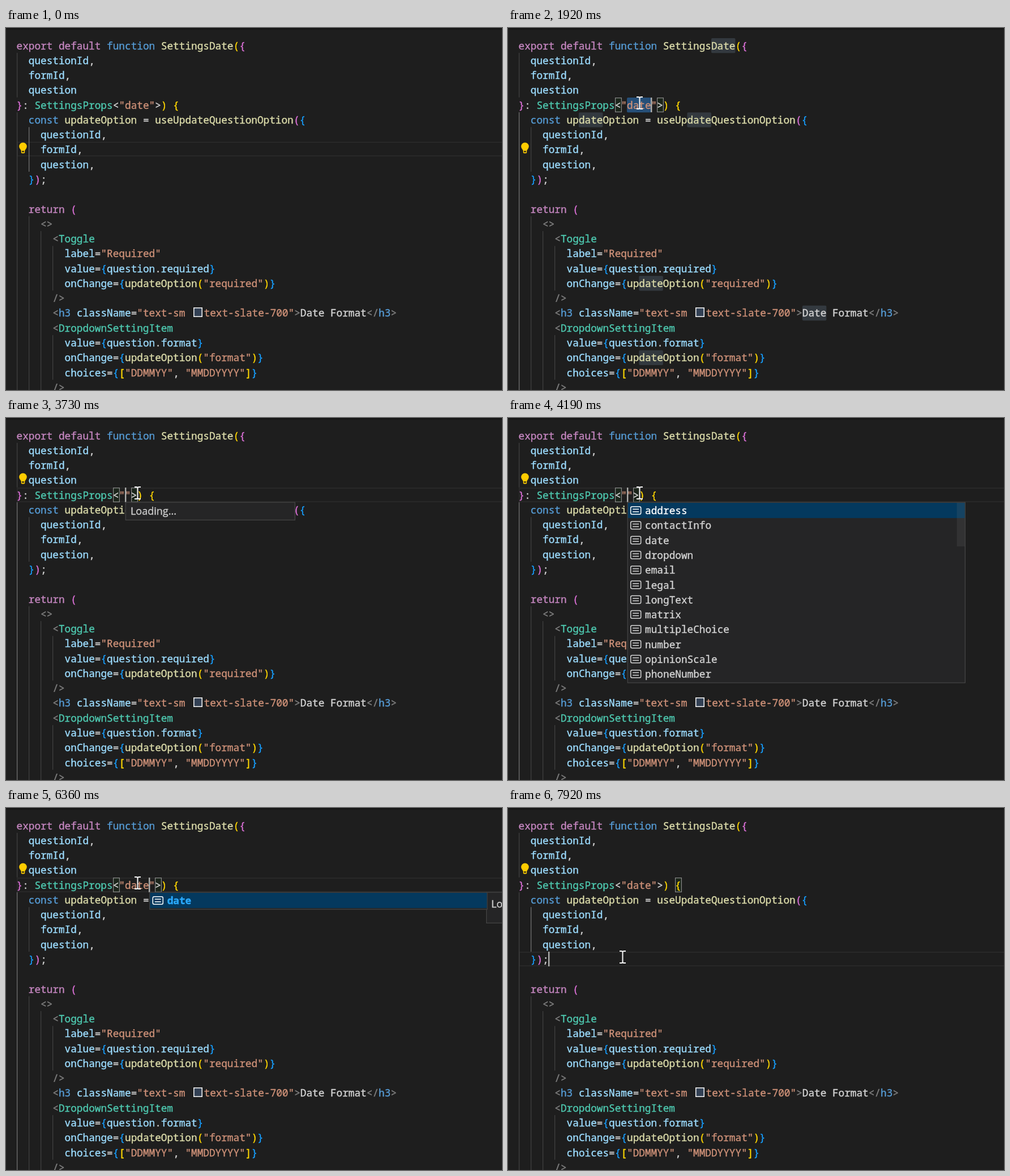
Recreate the animation shown at these times as an HTML page with a canvas. Size 876x640 px, loop 7.99 s.

```html
<!DOCTYPE html>
<html lang="en">
<head>
<meta charset="utf-8">
<title>Code editor autocomplete</title>
<style>
  html, body { margin: 0; width: 100%; height: 100%; overflow: hidden; background: #1e1e1e; }
  canvas { display: block; }
</style>
</head>
<body>
<canvas id="stage" width="876" height="640"></canvas>
<script>
const ctx = document.getElementById('stage').getContext('2d');
const LOOP = 7990, W = 876, H = 640;
const X0 = 18.5, ADV = 10.64, TOP = 17.6, ROW = 26.27, BASE = 20;
const SIZE = ADV / 0.6;
const MONO = '"Noto Sans Mono", "DejaVu Sans Mono", monospace';
const SANS = '18px "Open Sans", "Noto Sans", sans-serif';

const COLORS = {
  p: '#c586c0', b: '#569cd6', y: '#dcdcaa', v: '#9cdcfe', t: '#4ec9b0', s: '#ce9178',
  w: '#d4d4d4', x: '#808080', g: '#ffd700', o: '#da70d6', u: '#179fff'
};

// Each "~" starts a run; the next letter is its colour, "#" is the colour swatch.
const propsLine = value => `~o}~w: ~tSettingsProps~w<~s"${value}"~w>~g) {`;
const LINES = [
  '~pexport default ~bfunction ~ySettingsDate~g(~o{',
  '~w  ~vquestionId~w,',
  '~w  ~vformId~w,',
  '~w  ~vquestion',
  '',
  '~w  ~bconst ~yupdateOption ~w= ~yuseUpdateQuestionOption~o(~u{',
  '~w    ~vquestionId~w,',
  '~w    ~vformId~w,',
  '~w    ~vquestion~w,',
  '~w  ~u}~o)~w;',
  '',
  '~w  ~preturn ~o(',
  '~w    ~x<>',
  '~w      ~x<~tToggle',
  '~w        ~vlabel~w=~s"Required"',
  '~w        ~vvalue~w=~u{~vquestion~w.~vrequired~u}',
  '~w        ~vonChange~w=~u{~yupdateOption~g(~s"required"~g)~u}',
  '~w      ~x/>',
  '~w      ~x<~bh3 ~vclassName~w=~s"text-sm ~#~stext-slate-700"~x>~wDate Format~x</~bh3~x>',
  '~w      ~x<~tDropdownSettingItem',
  '~w        ~vvalue~w=~u{~vquestion~w.~vformat~u}',
  '~w        ~vonChange~w=~u{~yupdateOption~g(~s"format"~g)~u}',
  '~w        ~vchoices~w=~u{~g[~s"DDMMYY"~w, ~s"MMDDYYYY"~g]~u}',
  '~w      ~x/>'
];
const OPTIONS = ['address', 'contactInfo', 'date', 'dropdown', 'email', 'legal', 'longText',
  'matrix', 'multipleChoice', 'number', 'opinionScale', 'phoneNumber'];

// column, first line, last line
const GUIDES = [[0, 1, 3], [0, 5, 24], [2, 6, 8], [2, 12, 24], [4, 13, 24], [6, 14, 16], [6, 20, 22]];

// line, column, extra offset of every other "date"
const MATCHES = [[0, 32, 0], [5, 10, 0], [5, 28, 0], [16, 20, 0], [18, 45, 22.5], [21, 20, 0]];

const colX = col => X0 + col * ADV;
const rowY = line => TOP + line * ROW;
const within = (t, from, to) => t >= from && t < to;

function rect(x, y, w, h, color) {
  ctx.fillStyle = color;
  ctx.fillRect(x, y, w, h);
}

function frame(x, y, w, h, fill, stroke, line = 1.2) {
  rect(x, y, w, h, fill);
  ctx.strokeStyle = stroke;
  ctx.lineWidth = line;
  ctx.strokeRect(x + line / 2, y + line / 2, w - line, h - line);
}

// The thin outline gives the glyphs a slightly heavier stem.
function text(str, x, y, color, font) {
  ctx.font = font || `${SIZE}px ${MONO}`;
  ctx.fillStyle = ctx.strokeStyle = color;
  ctx.lineWidth = 0.4;
  ctx.fillText(str, x, y);
  ctx.strokeText(str, x, y);
}

function mark(line, col, len, color, dx = 0) {
  ctx.fillStyle = color;
  ctx.beginPath();
  ctx.roundRect(colX(col) + dx, rowY(line) + 0.4, len * ADV, ROW, 2);
  ctx.fill();
}

function bracketBox(line, col) {
  frame(Math.round(colX(col)), Math.round(rowY(line)), 12, 26, 'rgba(0,100,0,.1)', '#888');
}

function codeLine(src, line) {
  let x = X0;
  for (const run of src.split('~').slice(1)) {
    if (run[0] === '#') {
      frame(331, Math.floor(rowY(line) + 4), 16, 17, '#334155', '#eeeeee', 1.6);
      x += 22.5;
    } else {
      const str = run.slice(1);
      text(str, x, rowY(line) + BASE, COLORS[run[0]]);
      x += str.length * ADV;
    }
  }
}

function bulb(line) {
  const y = rowY(line) + 0.5;
  ctx.fillStyle = '#ffcc00';
  ctx.beginPath();
  ctx.arc(30, y + 7.3, 6.8, 0, 7);
  ctx.fill();
  ctx.beginPath();
  ctx.moveTo(24.6, y + 11);
  ctx.lineTo(35.4, y + 11);
  ctx.lineTo(33.2, y + 15);
  ctx.lineTo(33.2, y + 18.5);
  ctx.lineTo(32, y + 19.6);
  ctx.lineTo(28, y + 19.6);
  ctx.lineTo(26.8, y + 18.5);
  ctx.lineTo(26.8, y + 15);
  ctx.fill();
  rect(28.2, y + 15.2, 3.6, 2.4, '#1e1e1e');
}

function beam(x, y) {
  const path = new Path2D();
  for (const s of [-1, 1]) {
    path.moveTo(x - 5.5, y + s * 10.6);
    path.lineTo(x - 2.5, y + s * 10.6);
    path.quadraticCurveTo(x, y + s * 10.6, x, y + s * 8.5);
    path.quadraticCurveTo(x, y + s * 10.6, x + 2.5, y + s * 10.6);
    path.lineTo(x + 5.5, y + s * 10.6);
  }
  path.moveTo(x, y - 9);
  path.lineTo(x, y + 9);
  ctx.strokeStyle = '#f4f4f4';
  ctx.lineWidth = 2;
  ctx.stroke(path);
}

function optionIcon(x, y, color) {
  ctx.strokeStyle = color;
  ctx.lineWidth = 1.5;
  ctx.beginPath();
  ctx.roundRect(x, y - 6.8, 18, 13.6, 2.5);
  for (const dy of [-2.2, 2.2]) {
    ctx.moveTo(x + 3.5, y + dy);
    ctx.lineTo(x + 14.5, y + dy);
  }
  ctx.stroke();
}

function suggestions(x, items, typed, slider) {
  const y = 148.5;
  frame(x, y, 597.3, items.length * ROW + 5, '#252526', '#454545');
  rect(x + 1.2, y + 1.5, 594.8, ROW + 0.6, '#04395e');
  items.forEach((item, i) => {
    const mid = y + 15 + i * ROW, color = i ? '#d4d4d4' : '#ffffff';
    optionIcon(x + 6, mid, color);
    const hit = item.slice(0, typed);
    if (hit) text(hit, x + 31.4, mid + 6.7, i ? '#18a3ff' : '#2aaaff', `bold ${SIZE}px ${MONO}`);
    text(item.slice(typed), x + 31.4 + typed * ADV, mid + 6.7, color);
  });
  if (slider) rect(x + 582, y + 1.5, 14, 77, `rgba(121,121,121,${slider})`);
}

function details(x) {
  frame(x, 148.5, 300, 55.5, '#252526', '#454545');
  text('Loading...', x + 9, 176, '#cccccc', SANS);
}

function hop(t, start, gap, n) {
  return Math.max(0, Math.min(n, Math.floor((t - start) / gap) + 1)) / n;
}

function pointer(t) {
  if (t < 110) return;
  const mix = (a, b, u) => [a[0] + (b[0] - a[0]) * u, a[1] + (b[1] - a[1]) * u];
  const near = [242.5, 144.5], word = [232.5, 132.5], below = [202.5, 263.5];
  const u = hop(t, 110, 68, 12);
  let p = mix([923, 725], near, 1 - (1 - u) * (1 - u));
  if (t >= 920) p = mix(near, word, hop(t, 920, 70, 3));
  if (t >= 7310) p = mix(word, below, hop(t, 7310, 68, 5));
  beam(...p);
}

function draw(t) {
  const CLICK = 1650, SELECT = 1720, MATCH = 1850, ERASE = 2780, LEAVE = 7720;
  const selected = within(t, SELECT, ERASE);
  const typed = Math.round(hop(t, 5840, 106, 4) * 4);
  const value = t < ERASE ? 'date' : 'date'.slice(0, typed);
  const line = within(t, CLICK, LEAVE) ? 4 : t < CLICK ? 7 : 9;

  rect(0, 0, W, H, '#1e1e1e');
  const shade = ctx.createLinearGradient(0, 0, 0, 4);
  shade.addColorStop(0, 'rgba(0,0,0,.45)');
  shade.addColorStop(1, 'rgba(0,0,0,0)');
  rect(0, 0, W, 4, shade);

  if (!selected) {
    ctx.strokeStyle = '#282828';
    ctx.lineWidth = 2;
    ctx.strokeRect(20, Math.round(rowY(line)) + 1, W, 24);
  }

  GUIDES.forEach(([col, from, to], i) => {
    const active = i === (line === 4 ? 1 : 2);
    rect(Math.round(colX(col)), rowY(from), 1.3, (to - from + 1) * ROW, active ? '#707070' : '#404040');
  });

  if (selected) {
    mark(4, 18, 4, '#264f78');
    if (t >= MATCH) MATCHES.forEach(([row, col, dx]) => mark(row, col, 4, '#33393f', dx));
  }
  if (within(t, MATCH, ERASE) || within(t, 2850, LEAVE)) {
    bracketBox(4, 16);
    bracketBox(4, 19 + value.length);
  }
  if (t >= 7920) bracketBox(4, 26);

  LINES.forEach((src, i) => codeLine(i === 4 ? propsLine(value) : src, i));
  bulb(t < 2380 ? 7 : 3);

  const hidden = [[0, CLICK], [2250, ERASE], [3260, 3730], [4250, 4800], [5290, 5840],
    [6630, 7110], [7610, LEAVE]].some(([a, b]) => within(t, a, b));
  if (!hidden) {
    const col = line === 9 ? 5 : t < SELECT ? 20 : 18 + value.length;
    rect(Math.floor(colX(col)), Math.round(rowY(line)), 2.4, 26, '#aeafad');
  }

  if (within(t, 3310, 4190)) {
    frame(210.7, 148.5, 300.3, 32.5, '#252526', '#454545');
    text('Loading...', 220, 171, '#cccccc', SANS);
  } else if (within(t, 4190, LEAVE)) {
    const x = 210.7 + typed * ADV;
    const items = typed ? OPTIONS.filter(o => o.startsWith(value)) : OPTIONS;
    if (within(t, 4390, 4590)) details(807);
    if (within(t, 6360, 6430)) details(848);
    suggestions(x, items, typed, typed ? 0 : t < 5150 ? 0.16 : 0.08);
  }

  pointer(t);
}

function tick(now) {
  draw(now % LOOP);
  requestAnimationFrame(tick);
}
requestAnimationFrame(tick);
</script>
</body>
</html>
```
